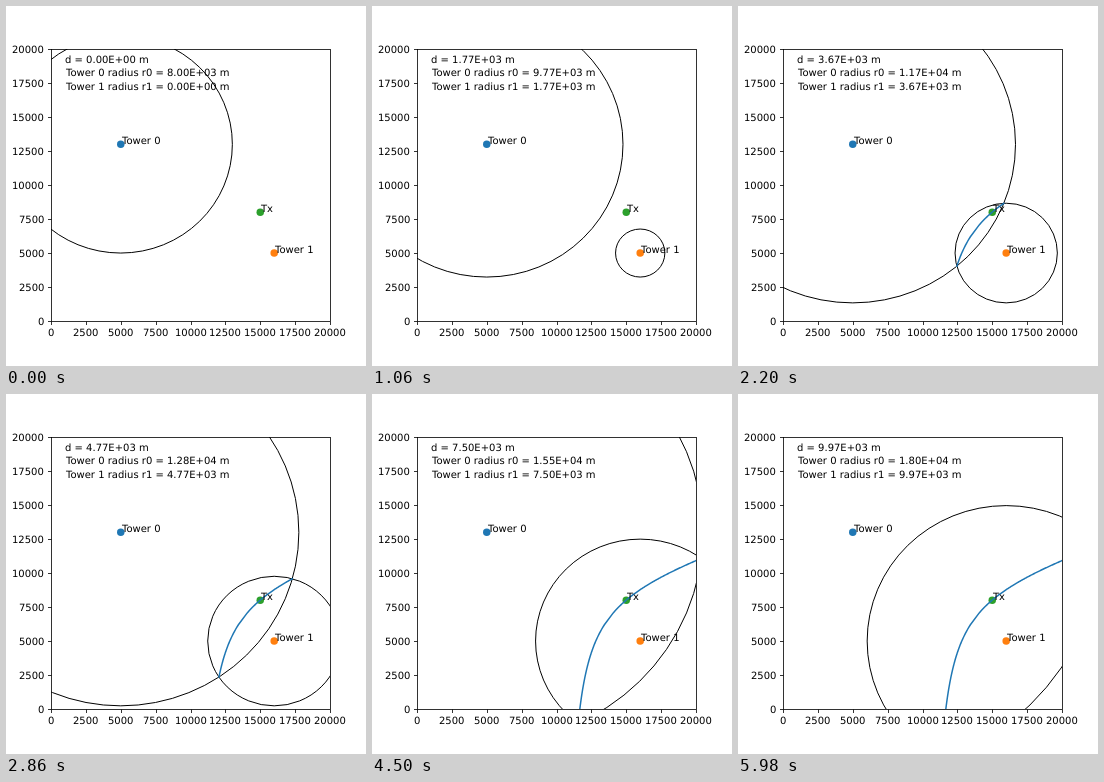
An HTML page with a canvas for the animation above (6000 ms loop, 360 px wide and 360 px high).

```html
<!DOCTYPE html>
<html>
<head>
<meta charset="utf-8">
<style>
html, body { margin: 0; width: 100%; height: 100%; overflow: hidden; background: #fff; }
canvas { display: block; }
</style>
</head>
<body>
<canvas id="plot" width="360" height="360"></canvas>
<script>
const ctx = document.getElementById('plot').getContext('2d');
const LEFT = 45, RIGHT = 324, TOP = 43.2, BOTTOM = 315, RANGE = 20000;
const STEPS = 300, STEP_MS = 20, MAX_D = 10000, GAP = 8000;
const kx = (RIGHT - LEFT) / RANGE, ky = (BOTTOM - TOP) / RANGE;
const px = x => LEFT + x * kx;
const py = y => BOTTOM - y * ky;

const tower0 = { x: 5000, y: 13000, name: 'Tower 0', color: '#1f77b4' };
const tower1 = { x: 16000, y: 5000, name: 'Tower 1', color: '#ff7f0e' };
const tx = { x: 15000, y: 8000, name: 'Tx', color: '#2ca02c' };
const sites = [tower0, tower1, tx];
const dx = tower1.x - tower0.x, dy = tower1.y - tower0.y, dist = Math.hypot(dx, dy);

const distanceAt = step => MAX_D * step / STEPS;
const sci = v => v.toExponential(2).replace('e+', 'E+0');

function text(s, x, y) {
  ctx.fillText(s, Math.round(x), Math.round(y));
}

function line(points, color, width) {
  ctx.strokeStyle = color;
  ctx.lineWidth = width;
  ctx.beginPath();
  points.forEach(p => ctx.lineTo(...p));
  ctx.stroke();
}

function ring(c, r) {
  ctx.strokeStyle = '#000';
  ctx.lineWidth = 1;
  ctx.beginPath();
  ctx.ellipse(px(c.x), py(c.y), r * kx, r * ky, 0, 0, 2 * Math.PI);
  ctx.stroke();
}

function dot(c) {
  ctx.fillStyle = c.color;
  ctx.beginPath();
  ctx.arc(px(c.x), py(c.y), 3.75, 0, 2 * Math.PI);
  ctx.fill();
}

// Points where the two circles have met so far, from lower end to upper end
function locus(step) {
  const points = [];
  for (let i = 0; i <= step; i++) {
    const r1 = distanceAt(i), r0 = r1 + GAP;
    if (r0 + r1 < dist) continue;
    const a = (dist * dist + r0 * r0 - r1 * r1) / (2 * dist);
    const h = Math.sqrt(r0 * r0 - a * a);
    const at = side => [
      px(tower0.x + (a * dx - side * h * dy) / dist),
      py(tower0.y + (a * dy + side * h * dx) / dist)
    ];
    points.unshift(at(-1));
    points.push(at(1));
  }
  return points;
}

function axes() {
  ctx.strokeStyle = '#000';
  ctx.lineWidth = 0.8;
  ctx.strokeRect(45.5, 43.5, 279, 272);
  for (let v = 0; v <= RANGE; v += 2500) {
    const x = Math.round(px(v)) + 0.5, y = Math.round(py(v)) + 0.5;
    line([[x, 315.5], [x, 319]], '#000', 0.8);
    line([[45.5, y], [42, y]], '#000', 0.8);
    const w = ctx.measureText(v).width;
    text(v, px(v) - w / 2, 330);
    text(v, 38 - w, py(v) + 3.8);
  }
}

function draw(step) {
  const d = distanceAt(step), r0 = d + GAP;
  ctx.fillStyle = '#fff';
  ctx.fillRect(0, 0, 360, 360);

  ctx.save();
  ctx.beginPath();
  ctx.rect(45, 43, 279, 272);
  ctx.clip();
  sites.forEach(dot);
  ring(tower0, r0);
  if (d) ring(tower1, d);
  ctx.lineCap = 'square';
  ctx.lineJoin = 'round';
  line(locus(step), '#1f77b4', 1.5);
  ctx.restore();

  ctx.fillStyle = '#000';
  ctx.font = '10px "DejaVu Sans", sans-serif';
  ctx.textRendering = 'geometricPrecision';
  axes();
  sites.forEach(s => text(s.name, px(s.x) + 1, py(s.y)));
  text(`d = ${sci(d)} m`, 59, py(19000));
  text(`Tower 0 radius r0 = ${sci(r0)} m`, 60, py(18000));
  text(`Tower 1 radius r1 = ${sci(d)} m`, 60, py(17000));
}

function tick() {
  draw(Math.floor(performance.now() / STEP_MS) % STEPS);
  requestAnimationFrame(tick);
}
tick();
</script>
</body>
</html>
```
